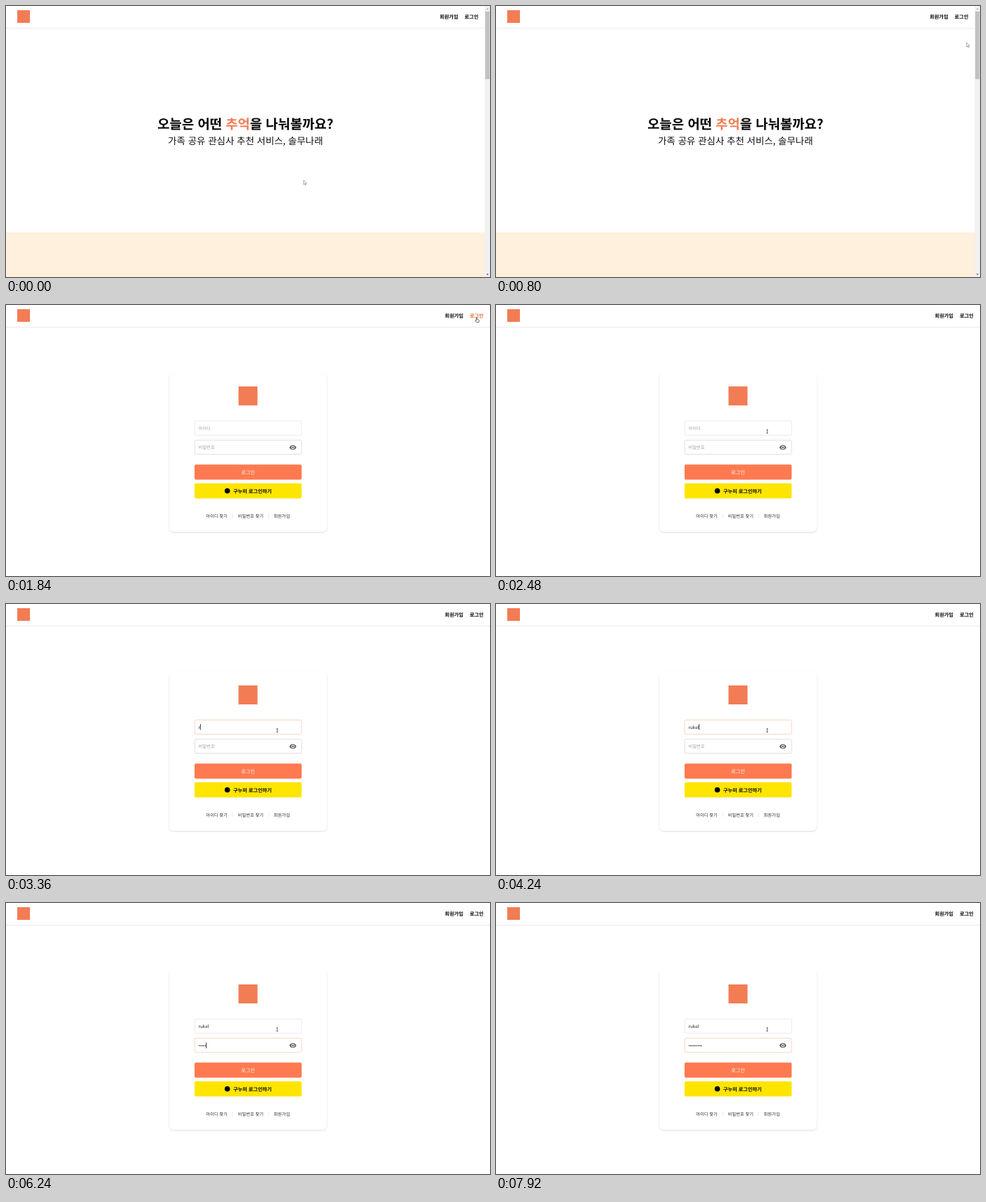
An HTML page that plays this animation: 688 px wide and 386 px high, repeating every 8000 ms.

```html
<!DOCTYPE html>
<html lang="ko">
<head>
<meta charset="utf-8">
<title>로그인</title>
<style>
html, body { margin: 0; width: 100%; height: 100%; overflow: hidden; background: #fff; }
svg { display: block; width: 688px; height: 386px; }
text { font: 6.27px "Noto Sans CJK KR", "Noto Sans CJK", "Noto Sans KR", sans-serif; text-rendering: geometricPrecision; white-space: pre; }
text.h1 { font-size: 18.8px; font-weight: 700; text-anchor: middle; }
text.h2 { font-size: 13.44px; text-anchor: middle; fill: #111; }
text.button { font-size: 7.17px; }
.nav text, text.bold { font-size: 7.17px; font-weight: 700; }
.accent { fill: #f27c54; }
.hint { fill: #a0a0a0; }
.links { fill: #2c2c2c; }
.field { fill: #fff; stroke: #d9d9dc; stroke-width: .8; }
#idField { stroke: #e6e6e8; }
#form .focus { stroke: #f5cdb8; }
.card { fill: #fff; filter: drop-shadow(0 1.3px 1.2px #0002); }
</style>
</head>
<body>
<svg viewBox="0 0 688 386">
  <path d="M0 31.5H688" stroke="#ebebeb"/>
  <rect class="accent" x="16" y="6" width="18" height="18"/>
  <g class="nav" id="nav">
    <text x="623.8" y="18.3">회원가입</text>
    <text id="login" x="659.2" y="18.3">로그인</text>
  </g>

  <g id="home">
    <text class="h1" x="340.4" y="174.7">오늘은 어떤 <tspan class="accent">추억</tspan>을 나눠볼까요?</text>
    <text class="h2" x="340.4" y="197">가족 공유 관심사 추천 서비스, 솔무나래</text>
    <rect y="322.4" width="681" height="64" fill="#ffefdd"/>
    <rect x="680.6" width="7.4" height="386" fill="#f1f1f1"/>
    <rect id="thumb" x="681.2" y="7.8" width="6.2" height="96.4"/>
    <path d="M682.8 5l1.6-1.8 1.6 1.8z" fill="#a3a3a3"/>
    <path d="M682.8 381.6l1.6 1.8 1.6-1.8z" fill="#505050"/>
  </g>

  <g id="form">
    <rect class="card" x="232.3" y="96" width="223.7" height="227" rx="6"/>
    <rect class="accent" x="330.5" y="116" width="27" height="27"/>
    <rect class="field" id="idField" x="268.3" y="165.2" width="151.9" height="20.2" rx="1.8"/>
    <rect class="field" id="pwField" x="268.3" y="192.5" width="151.9" height="20.2" rx="1.8"/>
    <text class="hint" id="idHint" x="273.6" y="177.6">아이디</text>
    <text class="hint" id="pwHint" x="273.6" y="205.4">비밀번호</text>
    <text id="idText" x="273.6" y="177.6" fill="#222"></text>
    <g id="dots" fill="#222"></g>
    <path id="caret" stroke="#111" stroke-width=".8"/>
    <path transform="translate(402.4 197.6) scale(.448)" fill="#666" fill-rule="evenodd"
      d="M12 4.5C7 4.5 2.73 7.61 1 12c1.73 4.39 6 7.5 11 7.5s9.27-3.11 11-7.5c-1.73-4.39-6-7.5-11-7.5zM12 17a5 5 0 1 1 0-10 5 5 0 0 1 0 10zm0-8a3 3 0 1 0 0 6 3 3 0 0 0 0-6z"/>
    <rect x="268" y="227.2" width="152.3" height="21.6" rx="2"/ fill="#ff7a50"/>
    <text class="button" x="344.1" y="240.7" fill="#fff" text-anchor="middle">로그인</text>
    <rect x="268" y="254" width="152.3" height="21.6" rx="2" fill="#fee500"/>
    <circle cx="314.6" cy="264.8" r="3.8"/>
    <text class="bold" x="323" y="267.7">구누미 로그인하기</text>
    <g class="links">
      <text x="284.2" y="302.6">아이디 찾기</text>
      <text x="329.8" y="302.6">비밀번호 찾기</text>
      <text x="380.6" y="302.6">회원가입</text>
    </g>
    <path d="M322.3 297v6.4M373.2 297v6.4" stroke="#ddd" stroke-width=".6"/>
  </g>

  <g id="cursor" stroke-linejoin="round">
    <path id="arrow" d="M0 0v6.4l1.5-1.4 1 2.2.9-.4-1-2.1h2z" fill="#fff" stroke="#555" stroke-width=".5"/>
    <path id="hand" d="M-.6 0q.6-.9 1.2 0v2.2l2.4.6q.6.3.5 1.2l-.5 2.5h-3l-2.1-2.7q.4-.8 1.5.2z" fill="#fff" stroke="#111" stroke-width=".6"/>
    <path id="beam" d="M-1.2-2.3h2.4M0-2.3v5M-1.2 2.7h2.4" fill="none" stroke="#333" stroke-width=".7"/>
  </g>
</svg>
<script>
const $ = id => document.getElementById(id);
const LOOP = 8000, PAGE = 1800, ID = "rukel", DOTS = 9;
const idFocus = 2700, idStart = 3300, idStep = 200;
const pwFocus = 4800, pwStart = 5180, pwStep = 250;
// time, x, y of the pointer
const track = [[340, 423, 248], [880, 684, 40], [990, 684, 40], [1280, 669, 18.3],
  [1920, 669, 18.3], [2420, 385.5, 180]];

const clamp = (v, a, b) => Math.min(b, Math.max(a, v));
const show = (id, on) => $(id).style.display = on ? "" : "none";
const typed = (t, start, step, max) => clamp(Math.floor((t - start) / step) + 1, 0, max);

function pointer(t) {
  let [, x, y] = track[0];
  for (let i = 1; i < track.length; i++) {
    const [t0, x0, y0] = track[i - 1], [t1, x1, y1] = track[i];
    if (t < t0) break;
    const p = clamp((t - t0) / (t1 - t0), 0, 1), e = p * p * (3 - 2 * p);
    x = x0 + (x1 - x0) * e;
    y = y0 + (y1 - y0) * e;
  }
  return [x, y];
}

$("dots").innerHTML = Array.from({ length: DOTS }, (_, i) =>
  `<circle cx="${274.8 + i * 2.12}" cy="203.3" r=".8"/>`).join("");

function draw(t) {
  const home = t < PAGE, shift = home ? -7.4 : 0;
  const [x, y] = pointer(t);
  const onLogin = x > 659 + shift && x < 679.5 + shift && y > 10 && y < 21;
  const onInput = !home && x > 268 && x < 420 && y > 165 && y < 213;
  show("home", home);
  show("form", !home);
  $("nav").setAttribute("transform", `translate(${shift})`);
  $("login").setAttribute("fill", onLogin ? "#ea6a38" : "#000");
  $("thumb").setAttribute("fill", home && x > 681 && y > 8 && y < 104 ? "#a8a8a8" : "#c1c1c1");

  $("cursor").setAttribute("transform", `translate(${x} ${y})`);
  show("hand", onLogin);
  show("beam", onInput);
  show("arrow", !onLogin && !onInput);

  const inPw = t >= pwFocus, inId = t >= idFocus && !inPw;
  const n = typed(t, idStart, idStep, ID.length), m = typed(t, pwStart, pwStep, DOTS);
  $("idField").classList.toggle("focus", inId);
  $("pwField").classList.toggle("focus", inPw);
  show("idHint", !n);
  show("pwHint", !m);
  $("idText").textContent = ID.slice(0, n);
  [...$("dots").children].forEach((dot, i) => dot.style.display = i < m ? "" : "none");

  // the caret restarts its blink at every key
  const key = inPw ? (m ? pwStart + (m - 1) * pwStep : pwFocus)
                   : (n ? idStart + (n - 1) * idStep : idFocus);
  show("caret", (inId || inPw) && (t - key) % 1000 < 500);
  const cx = inPw ? 274 + m * 2.12 : 274 + (n ? $("idText").getComputedTextLength() : 0);
  $("caret").setAttribute("d", `M${cx} ${inPw ? 198.6 : 171}v8.4`);
}

function frame(now) {
  draw(now % LOOP);
  requestAnimationFrame(frame);
}
draw(0);
requestAnimationFrame(frame);
</script>
</body>
</html>
```
